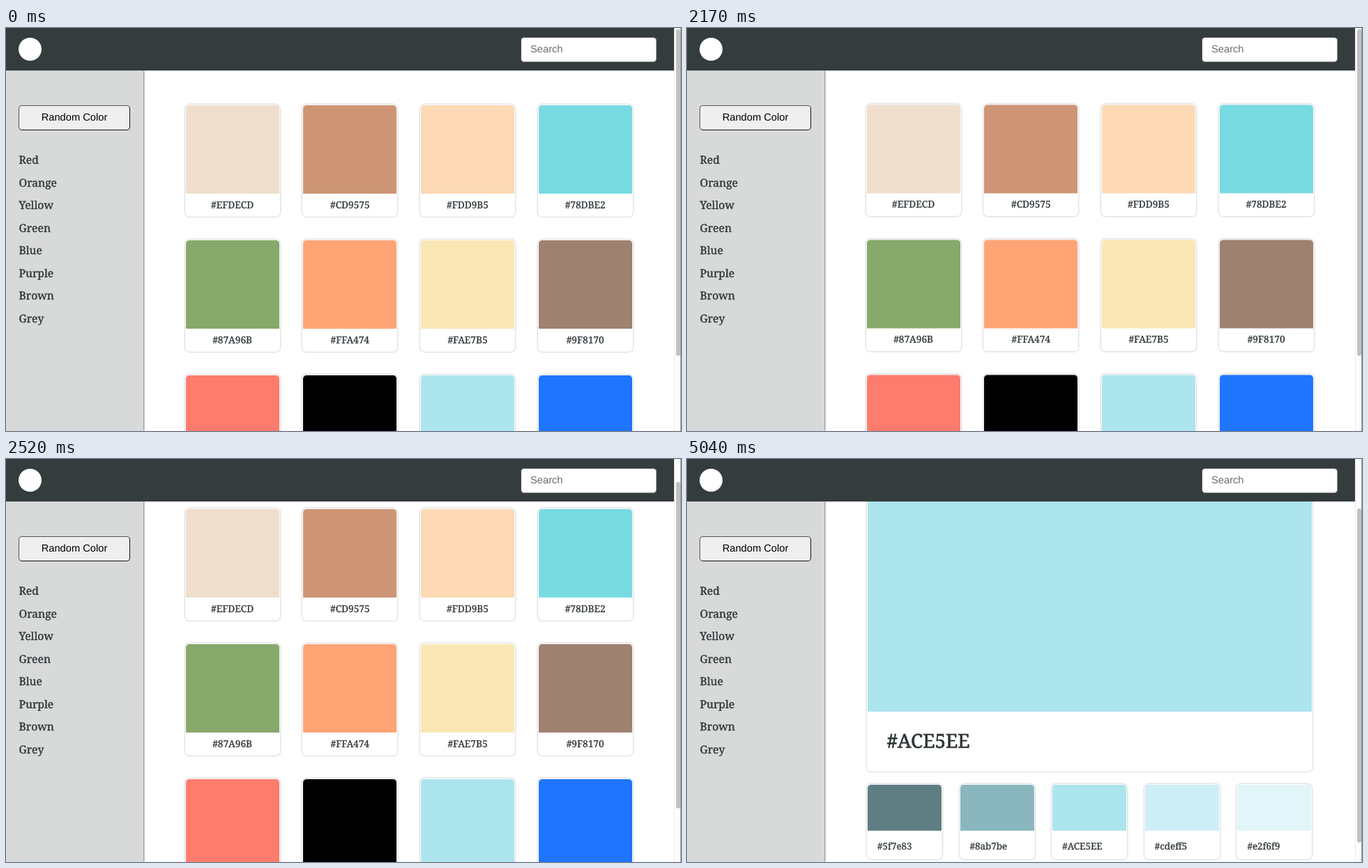
Recreate the animation shown at these times as an HTML page. Size 968 by 579 pixels, loop 8000 ms.

```html
<!DOCTYPE html>
<html lang="en">
<head>
<meta charset="utf-8">
<title>Color swatches</title>
<style>
@property --scroll { syntax: "<number>"; inherits: true; initial-value: 0; }
@property --thumb { syntax: "<length>"; inherits: true; initial-value: 469px; }

html, body { margin: 0; width: 100%; height: 100%; overflow: hidden; background: #fff; }
#stage {
  position: relative; width: 968px; height: 579px; overflow: hidden;
  color: #2d3437; font-family: "Noto Serif", serif; text-rendering: geometricPrecision;
  animation: scroll 8s step-end infinite;
}
#stage * { position: absolute; box-sizing: border-box; white-space: nowrap; }

header {
  left: 0; top: 0; width: 958px; height: 61px; background: #343c3e;
  box-shadow: 0 0 1px rgba(52, 60, 62, .6);
}
.logo { left: 18px; top: 14px; width: 33px; height: 33px; border-radius: 50%; background: #fff; }
.search, .random { border-radius: 5px; font: 14.7px/34px "Liberation Sans", Arial, sans-serif; }
.search {
  left: 738px; top: 13px; width: 195px; height: 36px; padding-left: 13px;
  background: #fff; color: #6c6c6c; border: 1px solid; border-color: #555 #999 #999 #555;
}
aside {
  left: 0; top: 61px; width: 197px; height: 518px; background: #d8dad9;
  box-shadow: 1px 0 2px rgba(0, 0, 0, .55);
}
.random {
  left: 18px; top: 50px; width: 160px; height: 36px;
  text-align: center; color: #000; background: #efefef;
  border: 1px solid; border-color: #555 #111 #111 #555;
}
p, span { -webkit-text-stroke: .022em; }
aside p { left: 18.5px; margin: 0; font-size: 15.7px; line-height: 30px; }

main { left: 0; top: 61px; width: 958px; height: 518px; overflow: hidden; }
#grid, #detail { left: 0; top: -61px; width: 958px; height: 700px; }
#grid { transform: translateY(calc(var(--scroll) * -1px)); animation: leave 8s step-end infinite; }
#detail { visibility: hidden; animation: enter 8s step-end infinite; }

.card { background: #fff; border-radius: 6px; box-shadow: 0 0 3px rgba(0, 0, 0, .32); }
.card i { left: 1px; right: 1px; top: 1px; border-radius: 5px 5px 0 0; }
.card span { left: 0; width: 100%; font-size: 13.7px; line-height: 24px; }
.tile { width: 136px; height: 161px; }
.tile i { height: 127px; }
.tile span { top: 133px; text-align: center; }
.shade { width: 108px; height: 108px; }
.shade i { height: 66px; }
.shade span { top: 77px; left: 15px; font-size: 13.4px; }
.hero { left: 258px; top: 0; width: 639px; height: 449px; }
.hero i { height: 362px; background: #ace5ee; }
.hero span { left: 28.5px; top: 384.5px; font-size: 27.8px; line-height: 40px; }

.track {
  left: 958px; top: 0; width: 10px; height: 579px; background: #fcfcfc;
  border: solid; border-width: 0 1px; border-color: #ececec #9a9a9a;
  border-left-color: #ececec;
}
.thumb {
  left: 1.5px; top: calc(2px + var(--scroll) * .795px); width: 6px; height: var(--thumb);
  border-radius: 3px; background: #c1c1c1;
}

@keyframes scroll {
  0% { --scroll: 0; --thumb: 469px; }
  27.125% { --scroll: .6; }
  28% { --scroll: 1.5; }
  28.875% { --scroll: 3; }
  29.75% { --scroll: 7; }
  30.625% { --scroll: 15; }
  31.5% { --scroll: 39; }
  32.375% { --scroll: 63; }
  33.25% { --scroll: 78; }
  34.125% { --scroll: 85; --thumb: 469px; }
  63%, 100% { --scroll: 86.5; --thumb: 480px; }
}
@keyframes leave { 0% { visibility: visible; } 63%, 100% { visibility: hidden; } }
@keyframes enter { 0% { visibility: hidden; } 63%, 100% { visibility: visible; } }
</style>
</head>
<body>
<div id="stage">
  <main>
    <div id="grid"></div>
    <div id="detail"><div class="card hero"><i></i><span>#ACE5EE</span></div></div>
  </main>
  <aside><div class="random">Random Color</div></aside>
  <header><div class="logo"></div><div class="search">Search</div></header>
  <div class="track"><div class="thumb"></div></div>
</div>
<script>
const $ = (selector) => document.querySelector(selector);

function addCard(parent, kind, color, x, y) {
  const card = document.createElement("div");
  card.className = "card " + kind;
  card.style.left = x + "px";
  card.style.top = y + "px";
  card.innerHTML = `<i style="background:${color}"></i><span>${color}</span>`;
  parent.append(card);
}

const colors = ["#EFDECD", "#CD9575", "#FDD9B5", "#78DBE2",
  "#87A96B", "#FFA474", "#FAE7B5", "#9F8170",
  "#FD7C6E", "#000000", "#ACE5EE", "#1F75FE"];
colors.forEach((color, i) =>
  addCard($("#grid"), "tile", color, 256.6 + (i % 4) * 168.7, 110 + Math.floor(i / 4) * 194));

["#5f7e83", "#8ab7be", "#ACE5EE", "#cdeff5", "#e2f6f9"].forEach((color, i) =>
  addCard($("#detail"), "shade", color, 258 + i * 132.6, 467));

["Red", "Orange", "Yellow", "Green", "Blue", "Purple", "Brown", "Grey"].forEach((name, i) => {
  const item = document.createElement("p");
  item.textContent = name;
  item.style.top = 113 + i * 32.55 + "px";
  $("aside").append(item);
});
</script>
</body>
</html>
```
